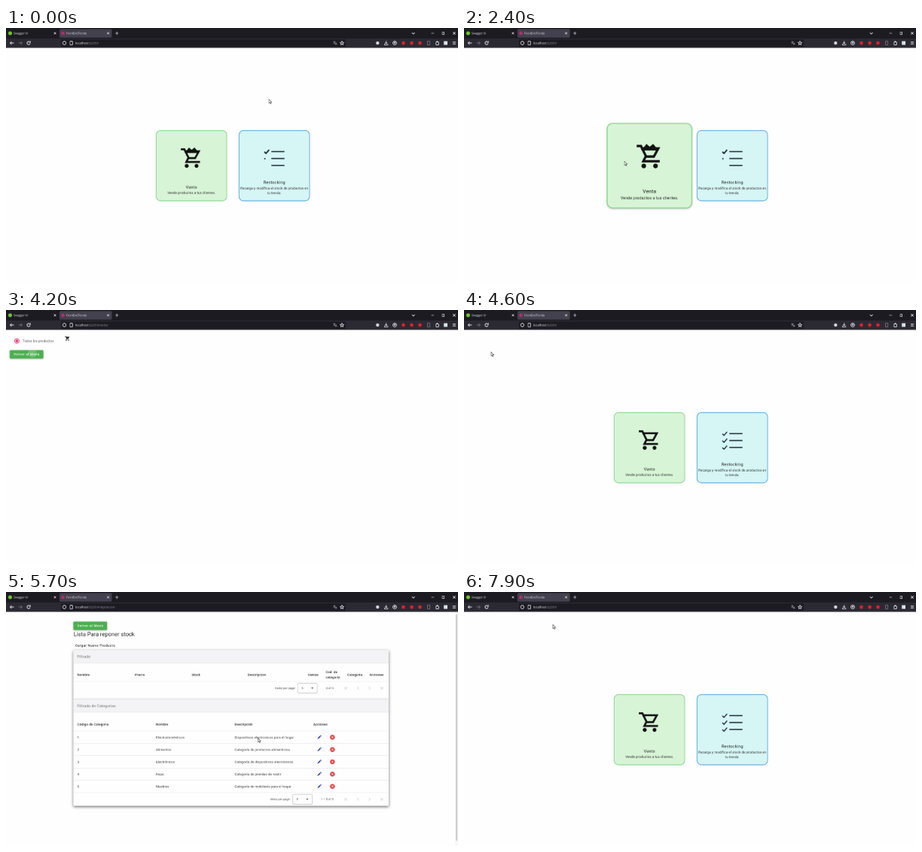
Write an HTML page with a canvas that moves like this. It is 600 px wide and 338 px high and loops after 8 s.

```html
<!DOCTYPE html>
<html lang="es">
<head>
<meta charset="utf-8">
<title>Tienda</title>
<style>
html, body { margin: 0; width: 100%; height: 100%; overflow: hidden; background: #fefefe; }
canvas { display: block; width: 600px; height: 338px; }
</style>
</head>
<body>
<canvas id="stage" width="600" height="338"></canvas>
<script>
// The screen is painted large and scaled down, so small text keeps its spacing.
const W = 600, H = 338, ZOOM = 3, LOOP = 8000;
const stage = document.getElementById('stage').getContext('2d');
const screen3 = document.createElement('canvas');
screen3.width = W * ZOOM;
screen3.height = H * ZOOM;
const ctx = screen3.getContext('2d');
ctx.scale(ZOOM, ZOOM);
stage.imageSmoothingQuality = 'high';

const UI = '"Open Sans", sans-serif', APP = 'Roboto, sans-serif';
const INK = '#222', LIGHT = '#f2f2f6', BODY = 4.375, ROW = 16.35;
const LEFT = 89.5, WIDTH = 418.5;

const CATEGORIES = [
  ['Electrodomésticos', 'Dispositivos electronicos para el hogar'],
  ['Alimentos', 'Categoría de productos alimenticios'],
  ['Electrónicos', 'Categoría de dispositivos electrónicos'],
  ['Ropa', 'Categoría de prendas de vestir'],
  ['Muebles', 'Categoría de mobiliario para el hogar']
].map((row, i) => [i + 1, ...row]);
const PRODUCTS = [
  'Arroz;90;196;Arroz blanco de alta calidad,|paquete de 5 kg;4;2;Alimentos',
  'Smartphone;799;98;Teléfono inteligente de última|generación;3;3;Electrónicos',
  'Camiseta;19;150;Camiseta de algodón, color|negro;30;4;Ropa',
  'Sofá;699;20;Sofá moderno de dos plazas;10;5;Muebles',
  'Cereal;3;120;Cereal de desayuno, caja de|500g;80;2;Alimentos'
].map(row => row.split(';'));
const PRODUCT_HEADS = 'Nombre;Precio;Stock;Descripcion;Ventas;Cod. de|categoria;Categoria;Acciones'.split(';');
const CATEGORY_HEADS = ['Código de Categoria', 'Nombre', 'Descripción', 'Acciones'];

const STOPS = [
  { t: 0, x: 349, y: 95 }, { t: 1100, x: 338, y: 101 }, { t: 1900, x: 246, y: 126 },
  { t: 2400, x: 213, y: 177.5 }, { t: 2800, x: 177, y: 184 }, { t: 3300, x: 60.5, y: 71.5 },
  { t: 3700, x: 36, y: 56 }, { t: 4600, x: 36, y: 56 }, { t: 5300, x: 299, y: 132 },
  { t: 5600, x: 334.5, y: 194.5 }, { t: 5700, x: 334.5, y: 194.5 }, { t: 6200, x: 61, y: 107 },
  { t: 6800, x: 118, y: 55 }, { t: 7100, x: 118, y: 43.5 }, { t: LOOP, x: 118, y: 43.5 }
];

const clamp = v => Math.max(0, Math.min(1, v));
const ease = v => v * v * (3 - 2 * v);

function setFont(size, weight = 400, font = APP, space = size * .022) {
  ctx.font = `${weight} ${size}px ${font}`;
  ctx.letterSpacing = `${space}px`;
}
function text(str, x, y, size = BODY, o = {}) {
  setFont(size, o.weight, o.font, o.space);
  ctx.fillStyle = o.color || INK;
  ctx.textAlign = o.align || 'left';
  String(str).split('|').forEach((line, i, all) =>
    ctx.fillText(line, x, y + size * .36 + (i - (all.length - 1) / 2) * (o.lead || 6.3)));
}
function rect(x, y, w, h, color, r = 0) {
  ctx.fillStyle = color;
  ctx.beginPath();
  ctx.roundRect(x, y, w, h, r);
  ctx.fill();
}
function box(x, y, w, h, color, width = .6, r = 0) {
  ctx.strokeStyle = color;
  ctx.lineWidth = width;
  ctx.beginPath();
  ctx.roundRect(x, y, w, h, r);
  ctx.stroke();
}
function disc(x, y, r, color) {
  ctx.fillStyle = color;
  ctx.beginPath();
  ctx.arc(x, y, r, 0, 7);
  ctx.fill();
}
function ring(x, y, r, color, width = .7, from = 0, to = 7) {
  ctx.strokeStyle = color;
  ctx.lineWidth = width;
  ctx.beginPath();
  ctx.arc(x, y, r, from, to);
  ctx.stroke();
}
// Points after the first are offsets from it.
function line(color, width, x, y, ...pts) {
  ctx.strokeStyle = color;
  ctx.lineWidth = width;
  ctx.beginPath();
  ctx.moveTo(x, y);
  for (let i = 0; i < pts.length; i += 2) ctx.lineTo(x + pts[i], y + pts[i + 1]);
  ctx.stroke();
}
function shape(color, ...pts) {
  ctx.fillStyle = color;
  ctx.beginPath();
  for (let i = 0; i < pts.length; i += 2) ctx.lineTo(pts[i], pts[i + 1]);
  ctx.closePath();
  ctx.fill();
}
function at(x, y, scale, draw, angle = 0) {
  ctx.save();
  ctx.translate(x, y);
  ctx.rotate(angle);
  ctx.scale(scale, scale);
  draw();
  ctx.restore();
}
function cross(x, y, r, color, width) {
  line(color, width, x - r, y - r, 2 * r, 2 * r);
  line(color, width, x + r, y - r, -2 * r, 2 * r);
}
function chevron(x, y, dir, color, size = 1.8) {
  line(color, .7, x - dir * size / 2, y - size, dir * size, size, 0, 2 * size);
}
function shadow(alpha, blur, dy, draw) {
  ctx.save();
  ctx.shadowColor = `rgba(0,0,0,${alpha})`;
  ctx.shadowBlur = blur * ZOOM;
  ctx.shadowOffsetY = dy * ZOOM;
  draw();
  ctx.restore();
}

// Cart on a 24-unit grid.
function cart(color, goods, filled) {
  line(color, 2, 1, 3, 3.6, 0, 8, 9, 14.6, 9, 18.4, 2, 3.6, 2);
  line(color, 2, 8.6, 12, -2, 4, 12, 4);
  for (const x of [7, 17]) disc(x, 20, 2, color);
  if (filled) shape(color, 5, 5, 19, 5, 16, 12, 8.5, 12);
  if (goods) shape(color, 5, 6.8, 9.3, 1.2, 12, 3.6, 15, 1.2, 19.6, 6.8);
}

function toolbarArrow(x, dir, color) {
  line(color, .8, x - dir * 2.5, 20, dir * 5, 0);
  chevron(x + dir * 1.5, 20, dir, color, 2.1);
}
function browser(path) {
  const label = { font: UI, color: LIGHT, space: 0 };
  rect(0, 0, W, 14, '#1c1b22');
  rect(0, 14, W, 12.4, '#2b2a33');
  rect(71, 1.5, 69.5, 11.3, '#42414d', 1.5);
  disc(5.5, 7, 2.6, '#6fc52f');
  text('Swagger UI', 10, 7, 3.7, label);
  disc(75.5, 7, 2.3, '#b52e6b');
  text('FrontEndTienda', 80, 7, 3.65, label);
  for (const x of [65, 135.5]) cross(x, 7, 1.3, LIGHT, .6);
  line(LIGHT, .7, 145, 7, 4.4, 0);
  line(LIGHT, .7, 147.2, 4.8, 0, 4.4);
  line(LIGHT, .8, 538.8, 6.2, 1.9, 1.8, 3.8, 0);
  line(LIGHT, .7, 564.5, 7, 3.6, 0);
  box(579, 5.8, 2.7, 2.7, LIGHT);
  cross(595, 7, 1.6, LIGHT, .7);

  toolbarArrow(8, -1, LIGHT);
  toolbarArrow(19, 1, '#73727c');
  ring(30, 20, 2.1, LIGHT, .8, .2, 5.4);
  line(LIGHT, .8, 32.2, 17.4, 0, 1.9, -1.8, 1.9);
  rect(73, 15.4, 378, 9.8, '#1c1b22', 1.3);
  ring(77.5, 20, 2.2, LIGHT);
  box(85, 17.7, 3.2, 4.7, LIGHT, .7, .5);
  text('localhost', 92, 20.1, 4.2, label);
  text(':62959' + path, 92 + ctx.measureText('localhost').width, 20.1, 4.2, { ...label, color: '#95949e' });
  text('文', 434.2, 19.4, 3.6, { ...label, font: '"Noto Sans CJK SC", sans-serif' });
  text('A', 437, 21, 3.8, label);
  at(446, 20.2, 1, () => {
    ctx.beginPath();
    for (let i = 0; i < 10; i++) {
      const r = i % 2 ? 1.2 : 2.6, a = (i / 5 - .5) * Math.PI;
      ctx.lineTo(r * Math.cos(a), r * Math.sin(a));
    }
    ctx.closePath();
    ctx.strokeStyle = LIGHT;
    ctx.lineWidth = .7;
    ctx.stroke();
  });

  disc(493.3, 20, 2.2, '#d5d4dc');
  line(LIGHT, .7, 504.6, 17.3, 0, 3.6);
  line(LIGHT, .7, 503.2, 19.5, 1.4, 1.4, 2.8, 0);
  line(LIGHT, .7, 502.4, 20.8, 0, 1.7, 4.4, 1.7, 4.4, 0);
  ring(516, 20, 2.4, LIGHT);
  disc(516, 19.6, 1.1, LIGHT);
  for (let i = 0; i < 3; i++) {
    disc(527.5 + i * 11, 20, 2.3, '#e0202b');
    line(LIGHT, .6, 593, 18.4 + i * 1.6, 4, 0);
  }
  box(559.7, 17.5, 2.8, 5, '#85848e', .7, .5);
  box(570.7, 18.7, 3.6, 3.6, LIGHT, .7, .4);
  disc(572.5, 18.2, .9, LIGHT);
  rect(581.2, 17.6, 4.8, 4.8, '#d9e6ea');
}

function card(x, fill, border, hover, draw) {
  at(x + 47.2, 183.2, 1 + .2 * hover, () => {
    shadow(.35 * hover, 3, 1, () => rect(-46.8, -46.8, 93.6, 93.6, fill, 6));
    box(-46.8, -46.8, 93.6, 93.6, border, 1, 6);
    draw();
  });
}
function menu(hoverSale, hoverStock, played) {
  const center = { align: 'center' };
  card(199, '#d7f4d6', '#83d88a', hoverSale, () => {
    at(-15.4, -25.7, 1.3, () => cart('#111', played));
    text('Venta', 0, 28.5, 5.625, center);
    text('Vende productos a tus clientes.', 0, 35.8, BODY, center);
  });
  card(309, '#d6f5f5', '#5aa9dd', hoverStock, () => {
    const dark = '#1b2530';
    for (let i = 0; i < 3; i++) {
      const y = -18.7 + i * 9.2;
      line(dark, 1.5, -4, y, 17.5, 0);
      if (!played || !i) line(dark, played ? 1.7 : 1.3, -13.3, y + .2, 2.2, 2.2, 6.4, -2.6);
    }
    if (played) disc(-12.6, -9.3, .9, dark);
    text('Restocking', 0, 22.2, 5.625, center);
    text('Recarga y modifica el stock de productos en|tu tienda.', 0, 33, BODY, center);
  });
}

function backButton(x, y, ripple) {
  shadow(.35, 2, .7, () => rect(x, y, 44.6, 11, '#4caf50', 1.3));
  if (ripple > 0 && ripple < 1) {
    ctx.save();
    ctx.clip();
    disc(x + 30, y + 4, 40 * ripple, `rgba(255,255,255,${.2 * (1 - ripple)})`);
    ctx.restore();
  }
  text('Volver al Menú', x + 5.2, y + 5.4, BODY, { weight: 500, color: '#fff', space: .39 });
}

function salePage(ripple) {
  const pink = '#e8245f';
  disc(14.5, 41.2, 5, '#fdf0f4');
  ring(14.5, 41.2, 2.9, pink, .8);
  disc(14.5, 41.2, 1.6, pink);
  text('Todos los productos', 22, 41.2, BODY, { color: '#444' });
  at(77.7, 34.3, .3125, () => cart(INK, false, true));
  backButton(5, 53.5, ripple);
}

function rule(y) { line('#dcdcdc', .4, LEFT, y, WIDTH, 0); }
function panel(title, top, bottom) {
  shadow(.6, 4, 1.3, () => rect(LEFT, top, WIDTH, bottom - top, '#fefefe', 1));
  rect(LEFT, top, WIDTH, 17, '#f3f2f4');
  rule(top + 17);
  text(title, LEFT + 5, top + 8.7, 4.9, { color: '#666', space: .16 });
}
function actions(x, y) {
  at(x, y, 1, () => {
    rect(-1.5, -.8, 3.6, 1.6, '#2c3fb0');
    rect(2.5, -.8, 1, 1.6, '#2c3fb0', .3);
    shape('#2c3fb0', -1.5, -.8, -1.5, .8, -3.4, 0);
  }, -Math.PI / 4);
  disc(x + 17.5, y, 3.2, '#e8353a');
  cross(x + 17.5, y, 1.2, '#fff', .7);
}
function table(heads, rows, cols, top, actionX) {
  heads.forEach((h, i) => text(h, cols[i], top, BODY, { weight: 500, lead: 7 }));
  rule(top + 9.1);
  rows.forEach((row, i) => {
    const y = top + 17.3 + i * ROW;
    row.forEach((v, j) => text(v, cols[j], y, BODY, { color: '#333' }));
    actions(actionX, y);
    rule(y + ROW / 2);
  });
}
function paginator(y, range, more) {
  const small = { align: 'right', color: '#333', space: .08 };
  text(range, 434.8, y, 3.75, small);
  const x = 434.8 - ctx.measureText(range).width - 37.5;
  text('Items per page:', x - 3, y, 3.75, small);
  box(x, y - 6.4, 26, 12.8, '#999', .4, 1.2);
  text('5', x + 5, y, 3.75);
  shape('#555', x + 17.7, y - .8, x + 20.9, y - .8, x + 19.3, y + 1);
  for (let i = 0; i < 4; i++) {
    const cx = 452 + i * 15.3, dir = i < 2 ? -1 : 1, color = more && i > 1 ? '#444' : '#d2d2d2';
    chevron(cx, y, dir, color);
    if (i % 3 === 0) line(color, .7, cx + dir * 2, y - 1.9, 0, 3.8);
  }
}
// Text columns share the spare width; the narrow ones hug their widest entry.
function productColumns(rows) {
  const spare = rows.length ? 64.6 : 70;
  setFont(BODY, 500);
  let x = LEFT + 5.2;
  return PRODUCT_HEADS.map((head, i) => {
    const entries = [head, ...rows.map(r => r[i] || '')].flatMap(s => s.split('|'));
    const widest = Math.min(25, Math.max(...entries.map(s => ctx.measureText(s).width)));
    const start = x;
    x += i < 4 ? spare + .4 * widest : widest + 9.5;
    return start;
  });
}
function stockPage(rows, ripple) {
  const shift = rows.length * ROW, split = 143 + shift;
  backButton(LEFT, 39.5, ripple);
  text('Lista Para reponer stock', 89.7, 56, 7.5, { space: 0 });
  text('Cargar Nuevo Producto', 92, 71.2, BODY, { weight: 500, space: .36 });

  panel('Filtrado', 77.3, split);
  const cols = productColumns(rows);
  table(PRODUCT_HEADS, rows, cols, 110, cols[7] + 7.3);
  paginator(128 + shift, rows.length ? '1 – 5 of 10' : '0 of 0', rows.length > 0);

  panel('Filtrado de Categorias', split, split + 141.5);
  table(CATEGORY_HEADS, CATEGORIES, [0, 1, 2, 3].map(i => 94.6 + i * 104.45), split + 33, 415.8);
  paginator(split + 132.8, '1 – 5 of 5', false);

  rect(596.3, 26.6, 3.7, H, '#f7f7f9');
  rect(597.3, 30, 1.8, 301 - shift / 2, '#c6c6ca', .9);
}

function pointer(t) {
  const i = STOPS.findIndex(s => s.t > t), a = STOPS[i - 1], b = STOPS[i];
  const k = ease((t - a.t) / (b.t - a.t));
  at(a.x + (b.x - a.x) * k, a.y + (b.y - a.y) * k, .95, () => {
    shape('#fff', 0, 0, 0, 5.4, 1.3, 4.3, 2.2, 6.3, 3.1, 5.9, 2.2, 3.9, 3.9, 3.9);
    ctx.strokeStyle = '#333';
    ctx.lineWidth = .55;
    ctx.stroke();
  });
}

function render(t) {
  const grow = start => ease(clamp((t - start) / 250));
  const onSale = t >= 2700 && t < 4500, onStock = t >= 5600 && t < 7800;
  rect(0, 0, W, H, '#fefefe');
  browser(onSale ? '/venta' : onStock ? '/reposicion' : '');
  if (onSale) salePage((t - 4150) / 350);
  else if (onStock) stockPage(t < 5900 ? [] : PRODUCTS, (t - 7150) / 350);
  else menu(t < 2700 ? grow(2020) : 0, t < 5600 ? grow(5340) : 0, t < 2700);

  // The pointer is not visible while it rests on a back button.
  const onButton = (onSale && t >= 3700) || (onStock && t >= 7080);
  if (!onButton) pointer(t);
  stage.drawImage(screen3, 0, 0, W, H);
}

function tick() {
  render(performance.now() % LOOP);
  requestAnimationFrame(tick);
}
tick();
</script>
</body>
</html>
```
